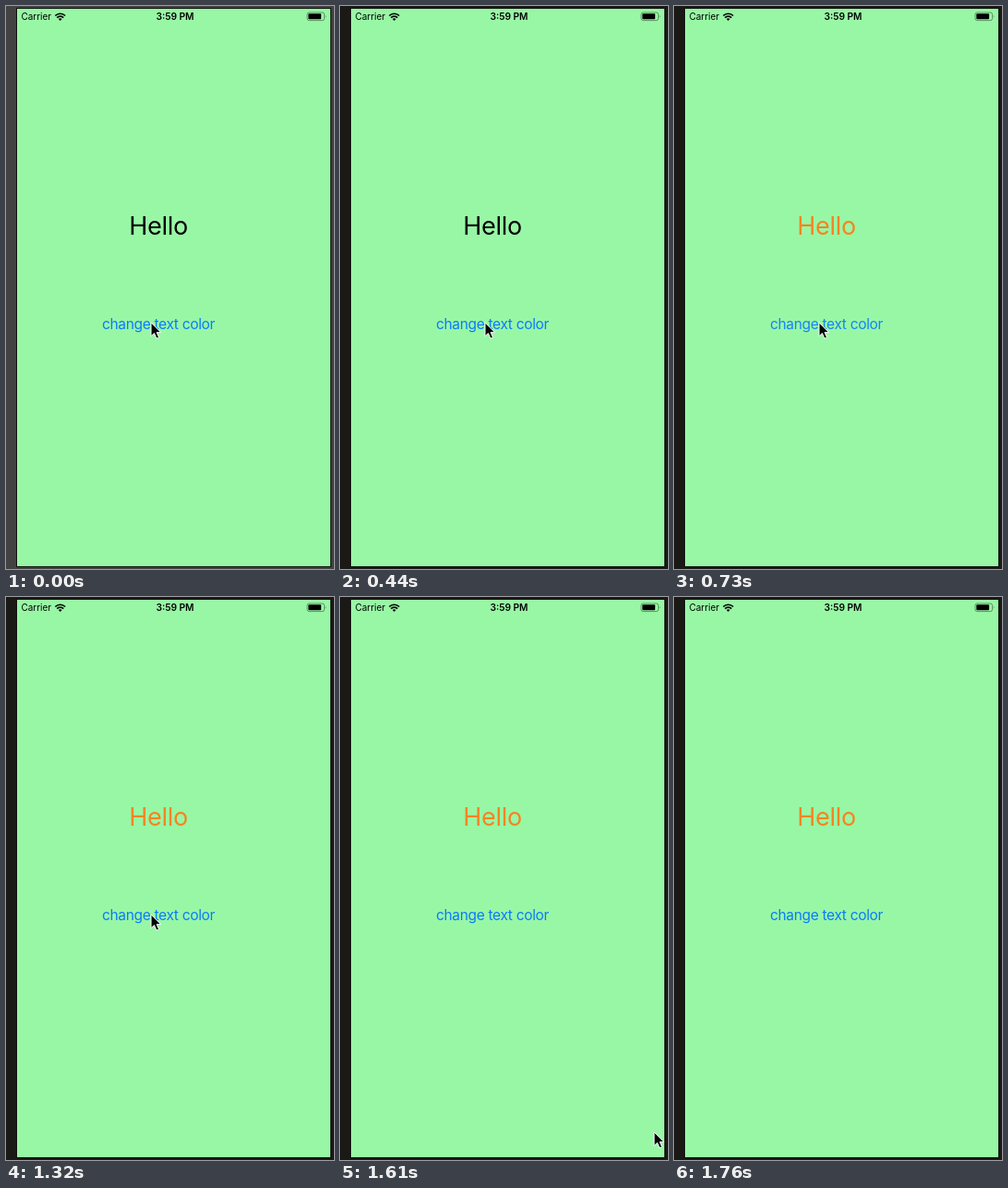
Write an HTML page that moves like this. It is 355x608 px and loops after 2.51 s.

```html
<!DOCTYPE html>
<html lang="en">
<head>
<meta charset="utf-8">
<title>Change text color</title>
<style>
  html, body { margin: 0; width: 100%; height: 100%; overflow: hidden; }
  svg { display: block; width: 355px; height: 608px; }
  text { font-family: Inter, "Liberation Sans", sans-serif; }
</style>
</head>
<body>
<svg viewBox="0 0 355 608">
  <rect id="desk" width="355" height="608"/>
  <rect x="11" y="2" width="341" height="604" fill="#10120f"/>
  <rect x="12" y="3" width="339" height="602" fill="#98f7a5"/>

  <!-- status bar -->
  <text x="16.5" y="15.3" font-size="10" letter-spacing="-.05">Carrier</text>
  <g fill="none" stroke="#000" stroke-width="1.7">
    <path d="M53.3 10.5a7.6 7.6 0 0 1 10.8 0"/>
    <path d="M55.2 12.6a4.9 4.9 0 0 1 7 0"/>
  </g>
  <path d="M58.7 16l-1.9-1.9a2.7 2.7 0 0 1 3.8 0z"/>
  <text x="183" y="15.3" font-size="10.2" font-weight="600" text-anchor="middle">3:59 PM</text>
  <rect x="326" y="7" width="18.6" height="8.6" rx="2.2" fill="none" stroke="#000" stroke-opacity=".45" stroke-width=".9"/>
  <rect x="327.3" y="8.3" width="13.8" height="6" rx="1"/>
  <path d="M345.8 9.8q1.4 1.5 0 3z" fill-opacity=".5"/>

  <text id="hello" x="165" y="246.5" font-size="27" letter-spacing="-.3" text-anchor="middle">Hello</text>
  <text id="button" x="165" y="349" font-size="15.5" letter-spacing="-.32" text-anchor="middle" fill="#0a7aff">change text color</text>

  <g id="cursor">
    <path d="M1 .8V15.6L4.4 12.4L6.9 18L9.5 16.9L7.1 11.4H11.6Z" stroke="#fff" stroke-width="1" stroke-linejoin="round"/>
  </g>
</svg>
<script>
const LOOP = 2510;
const [desk, hello, button, cursor] =
  ["desk", "hello", "button", "cursor"].map(id => document.getElementById(id));

// Each step holds its value from the given time on.
const at = (steps, t) => steps.filter(([start]) => t >= start).pop()[1];

const deskColor = [[0, "#434141"], [440, "#1b1916"]];
const helloColor = [[0, "#000"], [590, "#f58423"]];
const buttonAlpha = [[0, 1], [590, .5], [730, .93], [1320, 1]];
const pointer = [[0, [156, 341]], [1320, [156, 342]], [1470, [252.5, 433]], [1610, [339, 577]], [1760, null]];

const start = performance.now();
function draw() {
  const t = (performance.now() - start) % LOOP;
  desk.setAttribute("fill", at(deskColor, t));
  hello.setAttribute("fill", at(helloColor, t));
  button.setAttribute("fill-opacity", at(buttonAlpha, t));
  const tip = at(pointer, t);
  cursor.setAttribute("visibility", tip ? "visible" : "hidden");
  if (tip) cursor.setAttribute("transform", `translate(${tip})`);
  requestAnimationFrame(draw);
}
draw();
</script>
</body>
</html>
```
